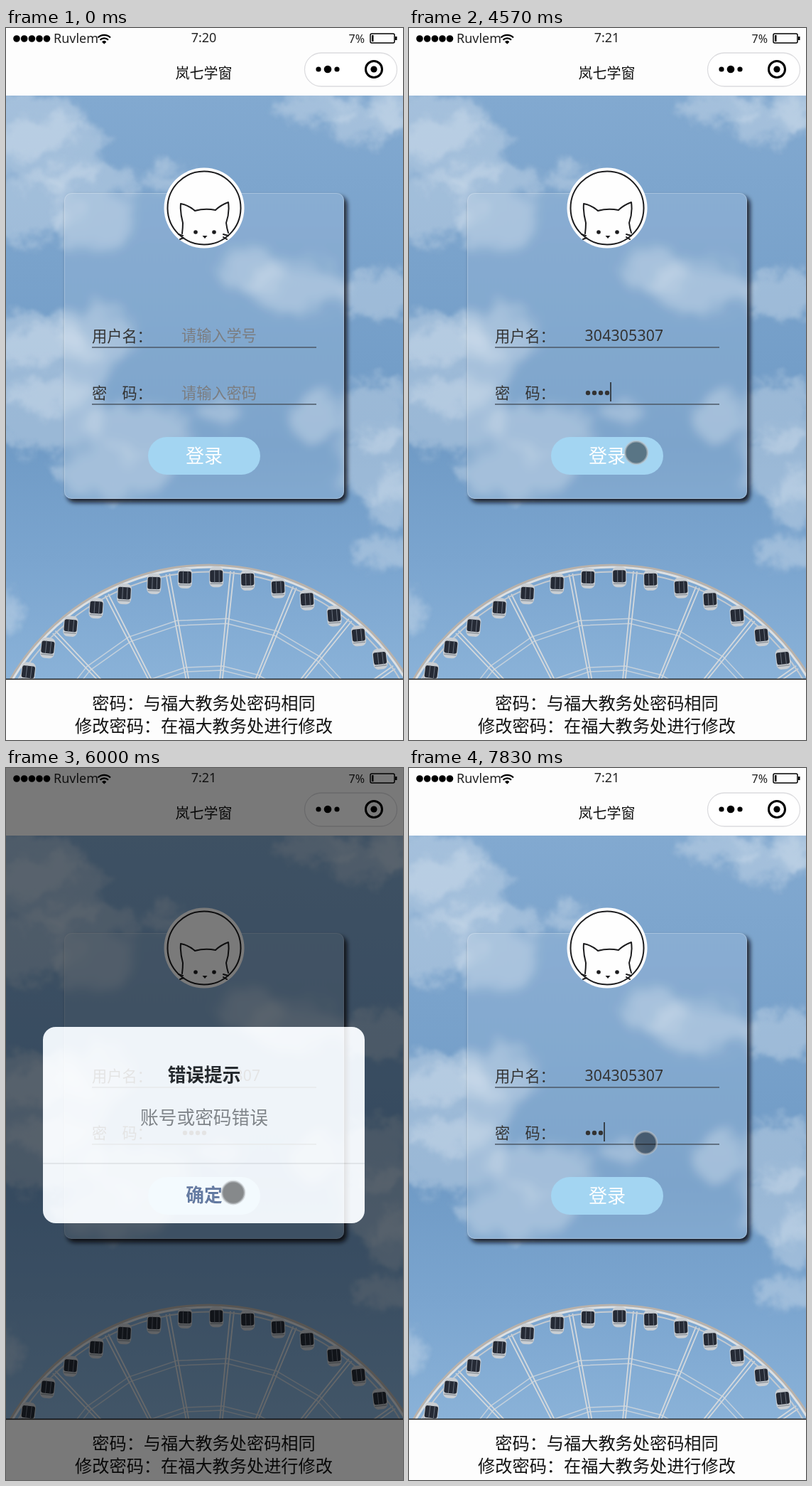
An HTML page for the animation above (8000 ms loop, 559x1001 px).

```html
<!DOCTYPE html>
<html lang="zh-CN">
<head>
<meta charset="utf-8">
<title>登录</title>
<style>
  html, body { margin: 0; width: 100%; height: 100%; overflow: hidden; background: #fdfdfd; }
  svg { position: absolute; left: 0; top: 0; will-change: transform; }
  text { font-family: "Noto Sans", "Noto Sans CJK SC", "Noto Sans CJK", sans-serif; white-space: pre; }
  .mid { text-anchor: middle; }
  .status { font-size: 18px; fill: #222; }
  .field { font-size: 21.2px; fill: #333; }
  .hint { font-size: 21.2px; fill: #7b7d80; }
  .note { font-size: 24.2px; fill: #111; }
  .modal { font-size: 25.7px; }
  .bold { font-weight: 700; }
</style>
</head>
<body>
<svg width="559" height="1001">
  <defs>
    <linearGradient id="blue" x2="0" y2="1">
      <stop offset="0" stop-color="#82a9d0"/>
      <stop offset=".6" stop-color="#709bc6"/>
      <stop offset=".8" stop-color="#7ba5cf"/>
      <stop offset="1" stop-color="#8ab2d8"/>
    </linearGradient>
    <filter id="fluff" filterUnits="userSpaceOnUse" x="-60" y="40" width="680" height="920" color-interpolation-filters="sRGB">
      <feGaussianBlur stdDeviation="6" result="soft"/>
      <feTurbulence type="fractalNoise" baseFrequency=".03" numOctaves="4" seed="4"/>
      <feDisplacementMap in="soft" scale="42" xChannelSelector="R" yChannelSelector="G"/>
      <feGaussianBlur stdDeviation=".8"/>
    </filter>
    <filter id="blur6" filterUnits="userSpaceOnUse" x="0" y="95" width="559" height="821"><feGaussianBlur stdDeviation="6"/></filter>
    <filter id="blur3" x="-10%" y="-10%" width="120%" height="120%"><feGaussianBlur stdDeviation="3"/></filter>
    <clipPath id="cardClip"><rect x="82" y="232" width="394" height="430" rx="10"/></clipPath>
    <g id="cabin">
      <rect x="-10" y="-14" width="20" height="29" rx="7" fill="#c9ced3"/>
      <rect x="-9" y="-9" width="18" height="17" rx="3" fill="#252a35"/>
      <path d="M-2.5-9V8M4-9V8" stroke="#69717d"/>
      <path d="M-8 10H8" stroke="#8f969e" stroke-width="1.5"/>
    </g>
    <g id="sky">
      <rect y="95" width="559" height="821" fill="url(#blue)"/>
      <g id="clouds" filter="url(#fluff)" fill="#d5dfec" fill-opacity=".42"/>
    </g>
  </defs>

  <use href="#sky"/>
  <g id="wheel" fill="none" stroke-linecap="round"/>

  <rect x="86" y="237" width="394" height="430" rx="10" fill="#0a1018" fill-opacity=".9" filter="url(#blur3)"/>
  <g clip-path="url(#cardClip)">
    <use href="#sky" filter="url(#blur6)"/>
    <rect x="82" y="232" width="394" height="430" fill="#fff" fill-opacity=".09"/>
  </g>
  <rect x="82.5" y="232.5" width="393" height="429" rx="10" fill="none" stroke="#fff" stroke-opacity=".25"/>

  <g fill="none" stroke="#1c1c1e" stroke-width="2" stroke-linecap="round" stroke-linejoin="round">
    <circle cx="279" cy="253" r="56.5" fill="#fefefe" stroke="none"/>
    <circle cx="279" cy="253" r="51.5"/>
    <path d="M248 289Q249 281 249 274Q245 259 246 247Q257 249 266 257Q280 253 295 256Q302 249 313 245Q315 260 310 274Q311 282 313 288M243 290l6 2M245 297l5-2M306 290l7 2M306 294l5 3"/>
    <g fill="#1c1c1e" stroke="none">
      <circle cx="267" cy="287" r="2.8"/><circle cx="293" cy="287" r="2.8"/>
      <path d="M276.500 292h7l-3.500 4z"/>
    </g>
  </g>

  <text class="field" x="121" y="440.5">用户名：</text>
  <text class="field" x="121" y="520.5">密　码：</text>
  <path d="M121 449H437M121 529H437" stroke="#4c5866" stroke-width="1.4"/>
  <rect x="200" y="575" width="158" height="53" rx="26.5" fill="#a3d5f2"/>
  <text class="mid" x="279" y="610.5" font-size="26" fill="#fff">登录</text>

  <rect y="915" width="559" height="86" fill="#fdfdfd"/>
  <path d="M0 915.500H559" stroke="#1a1a1a" stroke-width="1.5"/>
  <text class="note mid" x="278.500" y="958">密码：与福大教务处密码相同</text>
  <text class="note mid" x="278.500" y="990">修改密码：在福大教务处进行修改</text>

  <rect width="559" height="95" fill="#fdfdfd"/>
  <path d="M15 15h0M25.700 15h0M36.400 15h0M47 15h0M57.500 15h0" stroke="#000" stroke-width="9.600" stroke-linecap="round"/>
  <text class="status" x="67" y="20.5">Ruvlem</text>
  <g fill="none" stroke="#000" stroke-width="2.300">
    <path d="M129.500 13.500a12.500 12.500 0 0 1 17.500 0M132.500 16.800a8.200 8.200 0 0 1 11.500 0"/>
    <path d="M135.500 19.500a4 4 0 0 1 5.500 0l-2.750 2.500z" fill="#000" stroke-width="1"/>
  </g>
  <text class="status" x="482.500" y="21" style="font-size:16px">7%</text>
  <rect x="513" y="8" width="34" height="13" rx="2" fill="none" stroke="#000" stroke-width="1.500"/>
  <path d="M515 10h2.500v9h-2.500zM548 12h2.500v5h-2.500z"/>
  <text class="mid" x="278.500" y="70.500" font-size="20" fill="#111">岚七学窗</text>
  <rect x="420.500" y="35" width="130" height="47" rx="23.500" fill="#fff" stroke="#dcdcdf" stroke-width="1.300"/>
  <circle cx="440" cy="58" r="3.600"/><circle cx="453" cy="58" r="5.300"/><circle cx="466" cy="58" r="3.600"/>
  <circle cx="518" cy="58" r="11.500" fill="none" stroke="#000" stroke-width="3"/><circle cx="518" cy="58" r="4.600"/>
</svg>

<svg width="559" height="1001">
  <text id="clock" class="status mid" x="278.500" y="20.300"></text>
  <text id="userHint" class="hint" x="247" y="440">请输入学号</text>
  <text id="passHint" class="hint" x="247" y="520.500">请输入密码</text>
  <text id="user" class="field" x="247.500" y="440" letter-spacing=".2"></text>
  <path id="dots" stroke="#333" stroke-width="6.400" stroke-linecap="round"/>
  <path id="caret" stroke="#222" stroke-width="1.500"/>

  <g id="toast">
    <rect x="188" y="339" width="181" height="181" rx="7" fill="#4c4c4c"/>
    <g id="spinner" stroke-width="4" stroke-linecap="round"/>
    <text class="mid" x="279" y="479" font-size="21.200" fill="#dadada">正在登录...</text>
  </g>

  <g id="dialog">
    <rect width="559" height="1001" fill-opacity=".6"/>
    <rect x="52" y="364" width="453" height="276" rx="18" fill="#fff"/>
    <path id="pressed" d="M52 556H505V622a18 18 0 0 1-18 18H70a18 18 0 0 1-18-18z" fill="#ececec"/>
    <path d="M52 556H505" stroke="#d9d9d9"/>
    <text class="modal mid bold" x="279" y="441.300" fill="#191919">错误提示</text>
    <text class="modal mid" x="279" y="500.500" fill="#808080">账号或密码错误</text>
    <text class="modal mid bold" x="279" y="609.500" fill="#576b95">确定</text>
  </g>

  <circle id="touch" r="16" fill="#000" fill-opacity=".45" stroke="#bfc3c6" stroke-opacity=".55" stroke-width="3"/>
  <g id="mouse" transform="translate(320 597)">
    <circle r="18" fill="#f5f07c"/>
    <path d="M1 1V25L7 19.500L11.500 28.500L16 26L12 18L19.500 17.500Z" fill="#d8fb12" stroke="#000" stroke-width="1.600"/>
  </g>
</svg>

<script>
const LOOP = 8000, USER = '304305307';
const $ = id => document.getElementById(id);
const add = (parent, tag, attrs) => {
  const el = document.createElementNS('http://www.w3.org/2000/svg', tag);
  for (const k in attrs) el.setAttribute(k, attrs[k]);
  return parent.appendChild(el);
};

// Clouds: centre x, y and radii
[
  [25, 135, 85, 45], [60, 175, 80, 50], [120, 215, 70, 25], [30, 255, 70, 45], [125, 275, 60, 38],
  [230, 210, 36, 14], [435, 112, 52, 22], [510, 130, 55, 32], [555, 110, 40, 36],
  [345, 340, 42, 32], [410, 365, 75, 34], [525, 375, 50, 36],
  [35, 435, 75, 36], [60, 480, 85, 60], [130, 430, 50, 40], [60, 545, 80, 52],
  [185, 565, 75, 36], [150, 625, 80, 38], [300, 543, 32, 14],
  [435, 548, 34, 38], [520, 545, 48, 50], [525, 615, 58, 50], [545, 665, 30, 40],
  [532, 738, 42, 22], [2, 820, 16, 30]
].forEach(([cx, cy, rx, ry]) => add($('clouds'), 'ellipse', { cx, cy, rx, ry }));

// Ferris wheel
const polar = (deg, r) => {
  const a = deg * Math.PI / 180;
  return [286 + r * Math.sin(a), 1079 - r * Math.cos(a)];
};
const wheel = $('wheel'), STEP = 8.24;
const line = (d, stroke, width) => add(wheel, 'path', { d, stroke, 'stroke-width': width });
const spokes = Array.from({ length: 9 }, (_, i) => 5.9 + (i - 4) * 2 * STEP);
for (const r of [250, 243, 183, 177])
  line('M' + spokes.map(a => polar(a, r)).join('L'), '#c3d0dc', 1.5);
for (const a of spokes) for (const off of [-.45, .45])
  line(`M${polar(a + off, 316)}L${polar(a + off * 2, 100)}`, '#d3d8dc', 1.8);
for (const [r, stroke, width] of [[324, '#b9b2ab', 3], [321, '#dde0e2', 3], [314.5, '#c5cbd1', 2]])
  add(wheel, 'circle', { cx: 286, cy: 1079, r, stroke, 'stroke-width': width });
for (let i = -7; i < 7; i++) {
  const a = 1.9 + i * STEP;
  add(wheel, 'use', { href: '#cabin', transform: `translate(${polar(a, 308)}) rotate(${-a / 8})` });
}

for (let i = 0; i < 12; i++) {
  const grey = 115 + i * 10;
  add($('spinner'), 'path', { d: 'M0-12V-21', stroke: `rgb(${grey},${grey},${grey})`, transform: `rotate(${(i + 1) * 30})` });
}

// Stepped tracks: time first, then the values held from there on
const typed = [[0, 0], [1090, 1], [1390, 5], [1570, 6], [1670, 7], [2040, 8], [2600, 9]];
const secret = [[0, 0], [4090, 1], [4180, 2], [4270, 3], [4370, 4], [7830, 3]];
const fade = [[0, 0], [5900, .45], [6000, .87], [6080, 1], [6540, 0]];
const pointer = [
  [0, -50, -50], [150, 326, 427], [510, 326, 428],
  [3170, 328, 426], [3260, 335, 421], [3350, 340, 417], [3450, 342, 416],
  [3630, 347, 420], [3720, 352, 440], [3810, 350, 480], [3910, 345, 508], [4000, 338, 516],
  [4470, 331, 552], [4570, 320, 597],
  [6720, 324, 575], [6820, 334, 525], [6920, 339, 498],
  [7100, 338, 500], [7190, 336, 508], [7280, 334, 518], [7380, 333, 524], [7470, 333, 527]
];
const at = (track, t) => track.filter(s => s[0] <= t).pop().slice(1);
const show = (id, on) => $(id).style.display = on ? '' : 'none';

function render(t) {
  const within = (a, b) => t >= a && t < b;
  const [count] = at(typed, t), [dots] = at(secret, t), [alpha] = at(fade, t), [x, y] = at(pointer, t);

  $('clock').textContent = t < 890 ? '7:20' : '7:21';
  $('user').textContent = USER.slice(0, count);
  show('userHint', !count);
  show('passHint', !dots);
  $('dots').setAttribute('d', Array.from({ length: dots }, (_, i) => `M${252 + 9 * i} 513h0`).join(''));

  const inUser = within(330, 890) || within(1090, 3170);
  const inPass = within(4000, 4680) || t >= 7830;
  $('caret').setAttribute('d', inUser ? `M${247.5 + 12.33 * count} 418v27` : inPass ? `M${248 + 9 * dots} 498v27` : '');

  show('toast', within(4770, 5900));
  $('spinner').setAttribute('transform', `translate(278.5 413) rotate(${Math.floor((t - 5820) * 12 / 1000) * 30})`);

  show('dialog', alpha);
  $('dialog').setAttribute('opacity', alpha);
  show('pressed', t >= 6370);

  const overDialog = within(6370, 6720);
  show('mouse', overDialog);
  show('touch', !overDialog);
  $('touch').setAttribute('transform', `translate(${x} ${y})`);
}

const start = performance.now();
(function tick() {
  render((performance.now() - start) % LOOP);
  requestAnimationFrame(tick);
})();
</script>
</body>
</html>
```
